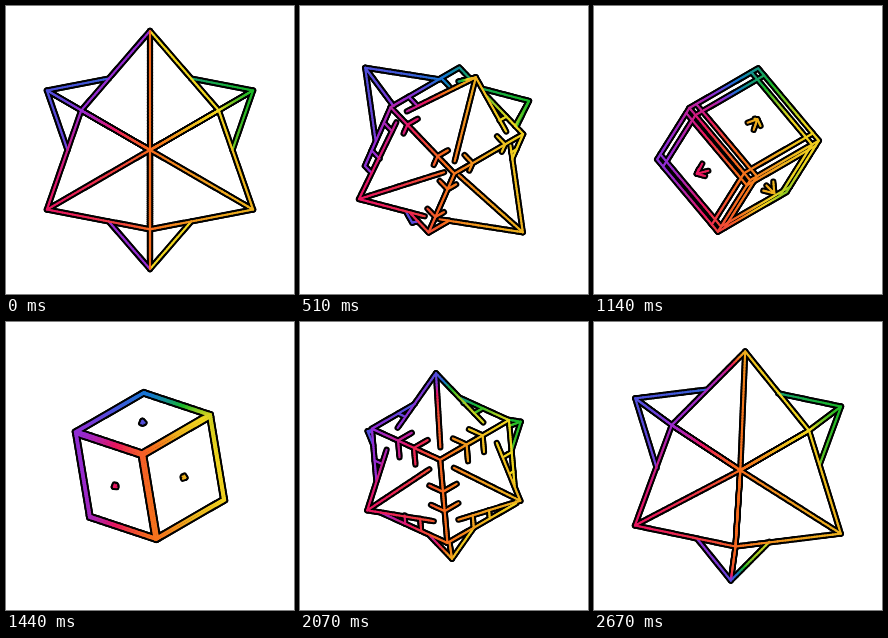
These frames come from a looping animation (288 by 288 pixels, 2.7 s). An HTML page with a canvas:

```html
<!DOCTYPE html>
<html lang="en">
<head>
<meta charset="utf-8">
<title>Spiked cube</title>
<style>
html, body { margin: 0; width: 100%; height: 100%; overflow: hidden; background: #fff; }
canvas { display: block; width: 288px; height: 288px; }
</style>
</head>
<body>
<canvas id="stage" width="288" height="288"></canvas>
<script>
const ctx = document.getElementById("stage").getContext("2d");
const LOOP = 2700, STEP = 30, MID = 144, HALF = 48.6;
const BLACK_WIDTH = 6.2, COLOR_WIDTH = 2.1, PARTS = 40, BIAS = 0.6;

// View axes at rest: x right, y down, z towards the viewer.
const S2 = Math.SQRT1_2, S3 = 1 / Math.sqrt(3), S6 = 1 / Math.sqrt(6);
const UP = [0, -2 * S6, S3], RIGHT = [S2, S6, S3], LEFT = [-S2, S6, S3];

// Colours around the upright axis, from the front over the right side.
const WHEEL = [
  [246, 108, 30], [238, 178, 30], [240, 214, 32], [24, 184, 40],
  [20, 120, 210], [80, 80, 220], [150, 44, 210], [232, 22, 96]
];

const dot = (a, b) => a[0] * b[0] + a[1] * b[1] + a[2] * b[2];
const mix = (a, b, k) => a.map((v, i) => v + (b[i] - v) * k);

function colorAt(p) {
  const r = dot(p, RIGHT), l = dot(p, LEFT);
  const turn = Math.atan2(r - l, r + l) / (2 * Math.PI);
  const pos = (turn + 1) % 1 * 8, i = Math.floor(pos);
  return `rgb(${mix(WHEEL[i % 8], WHEEL[(i + 1) % 8], pos - i).map(Math.round)})`;
}

// A cube and six rigid pyramids that slide out of it; slide runs from 0 to 1.
function build(slide) {
  const edges = [], tris = [];
  const signs = [-1, 1], square = [[-1, -1], [1, -1], [1, 1], [-1, 1]];
  for (let axis = 0; axis < 3; axis++) {
    const at = (n, u, v) => {
      const p = [0, 0, 0];
      p[axis] = n;
      p[(axis + 1) % 3] = u;
      p[(axis + 2) % 3] = v;
      return p;
    };
    for (const side of signs) {
      for (const v of signs) edges.push([at(-1, side, v), at(1, side, v)]);

      const [a, b, c, d] = square.map(([u, v]) => at(side, u, v));
      tris.push([a, b, c], [a, c, d]);

      const tip = at(side * (1 + 2 * slide), 0, 0);
      const base = square.map(([u, v]) => at(side * (2 * slide - 1), u, v));
      base.forEach((p, i) => {
        const next = base[(i + 1) % 4];
        edges.push([tip, p], [p, next]);
        tris.push([tip, p, next]);
      });
    }
  }
  return { edges, tris };
}

// A projected triangle with its doubled area, or null when seen edge-on.
function prepare([a, b, c]) {
  const d = (b[1] - c[1]) * (a[0] - c[0]) + (c[0] - b[0]) * (a[1] - c[1]);
  return Math.abs(d) < 0.01 ? null : { a, b, c, d };
}

function covers({ a, b, c, d }, p) {
  const dx = p[0] - c[0], dy = p[1] - c[1];
  const i = ((b[1] - c[1]) * dx + (c[0] - b[0]) * dy) / d;
  if (i < 0) return false;
  const j = ((c[1] - a[1]) * dx + (a[0] - c[0]) * dy) / d;
  const k = 1 - i - j;
  return j >= 0 && k >= 0 && i * a[2] + j * b[2] + k * c[2] > p[2] + BIAS;
}

function draw(time) {
  const angle = Math.floor(time % LOOP / STEP) * STEP / LOOP * 2 * Math.PI;
  const slide = Math.pow(Math.abs(Math.cos(angle / 2)), 1.63);
  const co = Math.cos(angle), si = Math.sin(angle);
  const up = UP.map((v, i) => co * v - si * RIGHT[i]);
  const right = RIGHT.map((v, i) => co * v + si * UP[i]);
  const place = p => LEFT.map((v, i) => HALF * (p[0] * right[i] + p[1] * v + p[2] * up[i]));

  const { edges, tris } = build(slide);
  const walls = tris.map(t => prepare(t.map(place))).filter(Boolean);
  const lines = [];
  for (const edge of edges) {
    const [a, b] = edge.map(place);
    for (let i = 0; i < PARTS; i++) {
      const m = mix(a, b, (i + 0.5) / PARTS);
      if (walls.some(w => covers(w, m))) continue;
      lines.push({ a: mix(a, b, i / PARTS), b: mix(a, b, (i + 1) / PARTS), color: colorAt(m), z: m[2] });
    }
  }
  lines.sort((p, q) => p.z - q.z);

  ctx.setTransform(1, 0, 0, 1, 0, 0);
  ctx.fillStyle = "#fff";
  ctx.fillRect(0, 0, 288, 288);
  ctx.translate(MID, MID);
  ctx.lineCap = "round";
  const stroke = (line, color, width) => {
    ctx.strokeStyle = color;
    ctx.lineWidth = width;
    ctx.beginPath();
    ctx.moveTo(line.a[0], line.a[1]);
    ctx.lineTo(line.b[0], line.b[1]);
    ctx.stroke();
  };
  for (const line of lines) stroke(line, "#000", BLACK_WIDTH);
  for (const line of lines) stroke(line, line.color, COLOR_WIDTH);
}

const start = performance.now();
function tick() {
  draw(performance.now() - start);
  requestAnimationFrame(tick);
}
tick();
</script>
</body>
</html>
```
